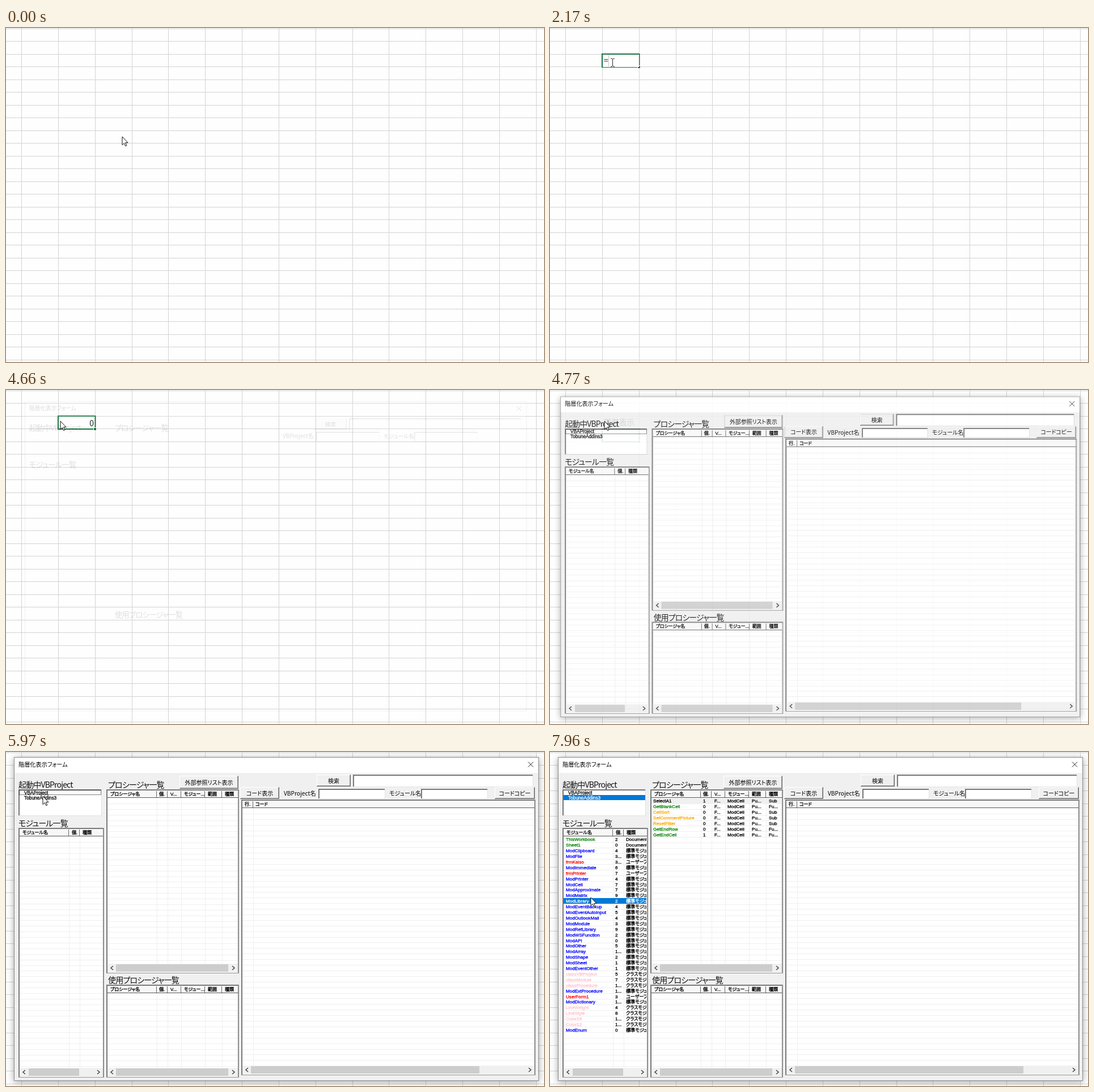
Animation of 949x590 px, one loop 7990 ms. Source, as an HTML page:

```html
<!DOCTYPE html>
<html lang="ja">
<head>
<meta charset="utf-8">
<title>階層化表示フォーム</title>
<style>
html, body { margin: 0; width: 100%; height: 100%; overflow: hidden; background: #fff; }
svg { display: block; width: 949px; height: 590px; }
text { font-family: "Noto Sans CJK JP", "Noto Sans CJK", sans-serif; font-feature-settings: "palt"; white-space: pre; stroke-width: 0; }
.list text { font-family: "Liberation Sans", "Noto Sans CJK JP", sans-serif; stroke-width: .3px; }
.label { letter-spacing: -.06em; }
.fx { font-family: "Liberation Serif", serif; font-style: italic; }
#win { transform-origin: 450px 268px; }
#frame { filter: drop-shadow(0 2px 6px rgba(0, 0, 0, .36)); }
</style>
</head>
<body>
<svg id="stage" viewBox="0 0 949 590"></svg>
<script>
const LOOP = 7990;
const GREEN = '#197441', BLUE = '#0078d7', FACE = '#f0f0f0';
const stage = document.getElementById('stage');

const rect = (x, y, w, h, fill, more = '') =>
  `<rect x="${x}" y="${y}" width="${w}" height="${h}" fill="${fill}" ${more}/>`;
const text = (x, y, str, size, fill = '#000', more = '') =>
  `<text x="${x}" y="${y}" font-size="${size}" fill="${fill}" stroke="${fill}" ${more}>${str}</text>`;
const line = (d, stroke, more = '') => `<path d="${d}" fill="none" stroke="${stroke}" ${more}/>`;
const group = (attrs, body) => `<g ${attrs}>${body}</g>`;
const range = (n, fn) => Array.from({ length: n }, (_, i) => fn(i)).join('');

// Worksheet
function sheet() {
  const cols = range(15, i => `M${Math.floor(27.48 + 64.85 * i) + .5} 0V590`);
  const rows = range(27, i => `M0 ${Math.floor(1 + 22.5 * i) + .5}H949`);
  return rect(0, 0, 949, 590, '#fefefe') + line(cols + rows, '#d3d3d3');
}

const selection = rect(92, 46, 65.5, 23, 'none', `stroke="${GREEN}" stroke-width="2"`) +
  rect(154, 66, 6, 6, '#fff') + rect(155, 67, 4, 4, GREEN);

function popup(names) {
  const rowH = 21.7;
  return rect(104.5, 71.5, 75, names.length * rowH + .6, '#fff', 'stroke="#767676"') +
    rect(124, 72, 55, 21, BLUE) +
    names.map((name, i) => {
      const y = 83 + rowH * i;
      return `<circle cx="116.5" cy="${y}" r="6.8" fill="#fff" stroke="#333"/>` +
        text(112.5, y + 3, 'fx', 10, '#222', 'class="fx"') +
        text(126, y + 4.8, name, 13.5, i ? '#222' : '#fff');
    }).join('');
}

const formula = '=kaiso()';
const cell = group('id="sel"', selection) +
  group('id="edit"', rect(93, 47, 64, 22, '#fff') +
    text(95, 62, [...formula].map((c, i) => `<tspan id="k${i}">${c}</tspan>`).join(''), 14, '#222', 'id="typed"') +
    group('id="caret"', rect(0, 47, 1, 21, '#222'))) +
  group('id="zero"', text(155, 64, '0', 14, '#222', 'text-anchor="end"')) +
  group('id="result"', text(95, 62, '階層表示', 13.5, '#222')) +
  group('id="pop3"', popup(['Kaiso', 'Kaiso', 'KURT'])) +
  group('id="pop2"', popup(['Kaiso', 'Kaiso']));

// Form controls
function bevel(x, y, w, h, fill, top, bottom, t = 1) {
  return rect(x, y, w, h, bottom) + rect(x, y, w - 1, h - 1, top) + rect(x + t, y + t, w - t - 1, h - t - 1, fill);
}
const label = (x, y, str) => text(x, y, str, 14, '#111', 'class="label"');
const field = (x, y, w, h) => bevel(x, y, w, h, '#fff', '#777', '#e3e3e3', 2);
const button = (x, y, w, h, str) =>
  bevel(x, y, w, h, '#a0a0a0', '#fff', '#696969') + rect(x + 1, y + 1, w - 3, h - 3, FACE) +
  text(x + w / 2, y + h / 2 + 4, str, 10, '#000', 'text-anchor="middle"');

function scrollbar(x, y, w, from, to) {
  const mid = y + 7.5, r = x + w;
  return rect(x, y, w, 15, FACE) + rect(from, y + 1, to - from, 13, '#cdcdcd') +
    line(`M${x + 10} ${mid - 3.5}l-4 3.5 4 3.5M${r - 10} ${mid - 3.5}l4 3.5-4 3.5`, '#444', 'stroke-width="1.5"');
}

const PITCH = 9.9;
function listView(x, y, w, h, heads, seps, thumb) {
  const bottom = y + h - 17;
  let rows = '';
  for (let ly = y + 25.3; ly < bottom; ly += PITCH) rows += `M${x + 2} ${Math.floor(ly) + .5}H${x + w - 2}`;
  const cols = seps.map(s => `M${s + 1.5} ${y + 15}V${bottom}`).join('');
  return bevel(x, y, w, h, '#fff', '#7a7a7a', '#909090', 2) + rect(x + w - 2, y, 1, h, '#8a8a8a') +
    line(rows + cols, '#efefef') +
    rect(x + 2, y + 2, w - 4, 12, '#f7f7f7') + rect(x + 2, y + 14, w - 4, 1, '#555') +
    seps.map(s => rect(s, y + 3, 1, 11, '#666')).join('') +
    heads.map(([hx, str]) => text(hx, y + 11, str, 8)).join('') +
    scrollbar(x + 2, bottom, w - 4, ...thumb);
}

// One row of a list: cells are [x, text, colour]
const rowY = (top, i) => top + 23.3 + PITCH * i;
const listRow = (top, i, cells) => cells.map(([x, str, fill]) => text(x, rowY(top, i), str, 8.1, fill)).join('');

const KINDS = {
  d: ['#008000', 'Document'], m: ['#0000ff', '標準モジュール'],
  f: ['#ff0000', 'ユーザーフォーム'], c: ['#ffc0cb', 'クラスモジュール']
};
const modules = `ThisWorkbook d 2,Sheet1 d 0,ModClipboard m 4,ModFile m 3...,frmKaiso f 3...,ModImmediate m 6,
frmPrinter f 7,ModPrinter m 4,ModCell m 7,ModApproximate m 7,ModMatrix m 9,ModLibrary m 2,ModEventBackup m 4,
ModEventAutoInput m 5,ModOutlookMail m 4,ModModule m 3,ModRefLibrary m 9,ModWSFunction m 2,ModAPI m 0,
ModOther m 5,ModArray m 1...,ModShape m 2,ModSheet m 1,ModEventOther m 1,classVBProject c 5,classModule c 7,
classProcedure c 1...,ModExtProcedure m 1...,UserForm1 f 3,ModDictionary m 1...,LineWeight c 4,LineStyle c 8,
Color16 c 1...,Color12 c 1...,ModEnum m 0`.split(',').map(s => s.trim().split(' '));

function moduleRow(i, fill) {
  const [name, kind, count] = modules[i];
  const [color, type] = KINDS[kind];
  return listRow(134, i, [[28, name, fill || color], [115, count, fill], [134, type, fill]]);
}
const picked = (id, i) =>
  group(`id="${id}"`, rect(24, Math.floor(rowY(134, i) - 8), 146, 10, BLUE) + moduleRow(i, '#fff'));

const procs = [
  ['SelectA1', '#000', 1, 'Sub'], ['GetBlankCell', '#008000', 0, 'Fu...'], ['CellSort', '#ffa500', 0, 'Sub'],
  ['SetCommentPicture', '#ffa500', 0, 'Sub'], ['ResetFilter', '#ffa500', 0, 'Sub'],
  ['GetEndRow', '#008000', 0, 'Fu...'], ['GetEndCell', '#008000', 1, 'Fu...']
];
const procRows = rect(179, 82, 229, 9, FACE) + procs.map(([name, color, count, type], i) =>
  listRow(66, i, [[182, name, color], [270, count], [290, 'F...'], [313, 'ModCell'], [356, 'Pu...'], [386, type]])).join('');

const procHeads = [[184, 'プロシージャ名'], [270, '個.'], [290, 'V...'], [314, 'モジュー...'], [356, '範囲'], [386, '種類']];
const procSeps = [265, 284, 308, 350, 380];

const form =
  group('id="body"', rect(14, 9, 926, 572, FACE, 'id="frame"')) +
  rect(14.5, 9.5, 925, 571, 'none', 'stroke="#8c8c8c"') +
  rect(15, 10, 924, 27, '#fff') + text(22, 25.5, '階層化表示フォーム', 10.2) +
  line('M921 17.5l9 9m0-9l-9 9', '#222') +
  label(22, 63, '起動中VBProject') + label(22, 131, 'モジュール一覧') +
  label(180, 63, 'プロシージャ一覧') + label(180, 408, '使用プロシージャ一覧') +
  button(548, 40, 60, 21, '検索') + field(612, 40, 318, 22) +
  text(490, 77, 'VBProject名', 10.2) + field(551, 65, 118, 18) +
  text(676, 77, 'モジュール名', 10) + field(732, 65, 118, 18) +
  group('id="late"',
    button(306, 42, 104, 23, '外部参照リスト表示') + button(413, 62, 69, 21, 'コード表示') +
    button(862, 62, 71, 21, 'コードコピー') +
    group('class="list"',
      field(22, 66, 147, 47) + text(32, 74.5, 'VBAProject', 8.3) + text(32, 83.5, 'TobuneAddins3', 8.3) +
      rect(23.5, 67.5, 144, 8, 'none', 'stroke="#000" stroke-dasharray="1 1" id="focus"') +
      listView(22, 134, 151, 441, [[29, 'モジュール名'], [116, '個.'], [135, '種類']], [110, 129], [40, 129]) +
      listView(177, 66, 234, 325, procHeads, procSeps, [194, 392]) +
      listView(177, 411, 234, 164, procHeads, procSeps, [194, 392]) +
      listView(415, 84, 519, 487, [[421, '行.'], [440, 'コード']], [435], [432, 835]))) +
  group('class="list"',
    group('id="project"', rect(24, 76, 144, 9, BLUE) + text(32, 83.5, 'TobuneAddins3', 8.3, '#fff')) +
    group('clip-path="url(#cut)"',
      group('id="mods"', modules.map((_, i) => moduleRow(i)).join('')) + picked('pickA', 8) + picked('pickB', 11)) +
    group('id="procs"', procRows));

const pointer =
  '<path id="arrow" d="M0 0V14.6L3.4 11.4 5.7 16.6 7.9 15.6 5.6 10.6H10Z" fill="#fff" stroke="#111"/>' +
  '<path id="cross" d="M-2.5-6H2V-2.5H5.5V2H2V5.5H-2.5V2H-6V-2.5H-2.5Z" fill="#fff" stroke="#000" stroke-width="1.5"/>' +
  line('M-3-6.5H-1L.5-5.5 2-6.5H4M.5-5.5V6.5M-3 7.5H-1L.5 6.5 2 7.5H4', '#222', 'id="beam"');

stage.innerHTML = '<clipPath id="cut"><rect x="24" y="149" width="146" height="408"/></clipPath>' +
  sheet() + cell + group('id="win"', form) + group('id="ptr"', pointer);

// Timeline: times in ms become keyframe percentages
let css = '';
function animate(id, frames, ease = 'step-end') {
  const all = [...frames, [LOOP, frames[frames.length - 1][1]]];
  css += `@keyframes ${id}{${all.map(([ms, decl]) => `${(ms / LOOP * 100).toFixed(4)}%{${decl}}`).join('')}}` +
    `#${id}{animation:${id} ${LOOP}ms ${ease} infinite}`;
}
function show(id, ...times) {
  const vis = on => `visibility:${on ? 'visible' : 'hidden'}`;
  animate(id, [[0, vis(times[0] === 0)], ...times.map((ms, i) => [ms, vis(i % 2 === 0)])]);
}
const move = (x, y) => `transform:translate(${x}px,${y}px)`;

const typed = document.getElementById('typed');
const keyTimes = [1640, 2350, 2440, 2530, 2630, 2725, 3380, 3550];
keyTimes.forEach((ms, i) => show('k' + i, ms, 4520));

// Caret follows the typed width and fades when idle
const idleAfter = { 0: 2080, 5: 3140, 7: 4000 };
const caret = [[0, 'opacity:0']];
keyTimes.forEach((ms, i) => {
  const at = move(Math.round(95 + typed.getSubStringLength(0, i + 1)), 0);
  caret.push([ms, `opacity:1;${at}`]);
  if (idleAfter[i]) {
    [.75, .5, .25, 0].forEach((o, n) => caret.push([idleAfter[i] + 15 + n * 30, `opacity:${o};${at}`]));
  }
});
animate('caret', caret);

animate('sel', [[0, 'opacity:0'], [690, 'opacity:1'], [4715, 'opacity:1;' + move(0, 22.5)]]);
show('edit', 1640, 4520);
show('pop3', 2380, 2470);
show('pop2', 2470, 3410);
show('zero', 4520, 4715);
show('result', 4715);

const pose = (o, s) => `opacity:${o};transform:scale(${s})`;
animate('win', [[0, pose(0, .94)], [4620, pose(0, .94)], [4660, pose(.12, .956)], [4700, pose(.45, .972)],
  [4770, pose(.88, .99)], [4830, pose(.96, .997)], [4900, pose(1, 1)]], 'linear');
show('body', 4685);
show('late', 4685);
show('focus', 4685, 6160);
show('project', 6160);
show('mods', 6185);
show('pickA', 7180, 7955);
show('pickB', 7955);
show('procs', 7210);

show('arrow', 0, 130, 4520);
show('cross', 130, 1640);
show('beam', 1640, 4520);
animate('ptr', [
  [0, 205, 192], [100, 205, 192], [190, 188, 168], [310, 145, 118], [420, 90, 78], [500, 50, 64], [540, 44, 62],
  [620, 80, 61], [690, 105, 60.5], [770, 109.5, 60.5], [4000, 110.5, 60.5], [4090, 104, 57], [4200, 96, 55],
  [5350, 96, 55], [5480, 91, 58], [5680, 76, 69], [5830, 68, 76], [5960, 65, 78],
  [6470, 65, 78], [6560, 70, 96], [6700, 77, 150], [6840, 76, 208], [6960, 71, 232],
  [7480, 71, 232], [7600, 71.5, 242], [7740, 72, 253], [7860, 72, 257]
].map(([ms, x, y]) => [ms, move(x, y)]), 'linear');

const style = document.createElement('style');
style.textContent = css;
document.head.append(style);
</script>
</body>
</html>
```
